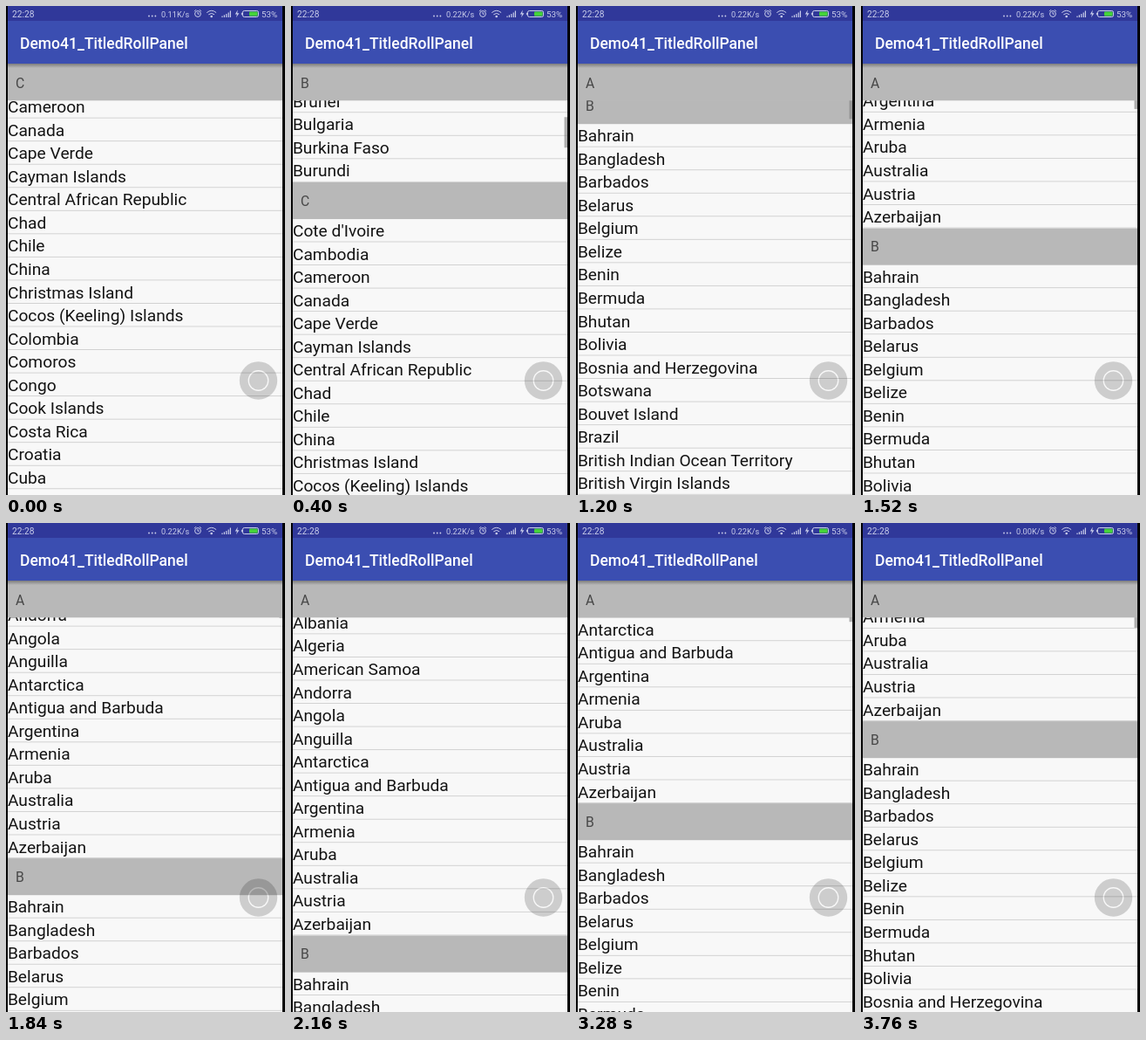
An HTML page for the animation above (3840 ms loop, 320 by 560 pixels).

```html
<!DOCTYPE html>
<html lang="en">
<head>
<meta charset="utf-8">
<title>Section list</title>
<style>
html, body { margin: 0; width: 100%; height: 100%; overflow: hidden; background: #000; }
svg { display: block; width: 320px; height: 560px; font-family: Roboto, sans-serif; }
.row { font-size: 19.22px; fill: #141414; }
.head { font-size: 15.8px; fill: #484848; }
.status { font-size: 10.2px; fill: #c9cdea; }
</style>
</head>
<body>
<svg viewBox="0 0 320 560" xmlns="http://www.w3.org/2000/svg">
  <defs>
    <clipPath id="pane"><rect x="2" y="66" width="315" height="494"/></clipPath>
    <linearGradient id="shade" x1="0" y1="0" x2="0" y2="1">
      <stop offset="0" stop-color="#000" stop-opacity=".32"/>
      <stop offset="1" stop-color="#000" stop-opacity="0"/>
    </linearGradient>
  </defs>
  <rect width="320" height="560" fill="#000"/>
  <g clip-path="url(#pane)">
    <rect x="2" y="66" width="315" height="494" fill="#f8f8f8"/>
    <g id="list"></g>
    <rect id="bar" x="313.5" width="4" height="35" fill="#7d7d7d" fill-opacity=".6"/>
    <rect x="2" y="66" width="315" height="42.3" fill="#b8b8b8"/>
    <text id="sticky" class="head" x="11" y="93.6"></text>
    <rect x="2" y="66" width="315" height="5" fill="url(#shade)"/>
  </g>
  <rect x="2" width="315" height="17" fill="#30389a"/>
  <rect x="2" y="17" width="315" height="49" fill="#3b4eb1"/>
  <text x="16" y="49" font-size="17.53" font-weight="500" fill="#fff">Demo41_TitledRollPanel</text>

  <g class="status">
    <text x="7" y="12.7">22:28</text>
    <circle cx="164" cy="11.5" r=".9"/><circle cx="167.7" cy="11.5" r=".9"/><circle cx="171.4" cy="11.5" r=".9"/>
    <text id="speed" x="178" y="12.7" font-size="9.2"></text>
    <text x="293" y="12.7" font-size="9.9">53%</text>
  </g>
  <g fill="none" stroke="#c9cdea" stroke-width="1">
    <circle cx="220" cy="9" r="3.4"/>
    <path d="M220 7v2.2h1.6M216 6.2l2-2M224 6.2l-2-2"/>
    <path d="M230.3 7.6q5.4-4.6 10.8 0M232.3 9.8q3.4-2.8 6.8 0"/>
    <path d="M248 13v-1.5M250.4 13v-2.7M252.8 13v-4M255.2 13v-5.6M257.4 13v-7.4" stroke-width="1.2"/>
    <rect x="271.5" y="5.5" width="18" height="7" rx="1.8"/>
    <path d="M270.4 7.7v2.6"/>
  </g>
  <circle cx="235.7" cy="12" r="1.3" fill="#c9cdea"/>
  <path d="M265.8 4.6l-3 4.8h2.2l-1 3.8 3.4-5h-2.2z" fill="#c9cdea"/>
  <rect x="279" y="6.5" width="9.6" height="5" rx=".8" fill="#45d33a"/>

  <!-- Dark disc with a clear ring that lets the list show through -->
  <g opacity=".17">
    <circle cx="289.5" cy="429" r="10.6"/>
    <circle cx="289.5" cy="429" r="16.8" fill="none" stroke="#000" stroke-width="9.8"/>
  </g>
</svg>
<script>
const LOOP = 3840, STEP = 80;
const ROW = 26.54, HEAD = 42.1, TOP = 110, PANE = 66;

const sections = {
  A: "Afghanistan,Albania,Algeria,American Samoa,Andorra,Angola,Anguilla,Antarctica,Antigua and Barbuda,Argentina,Armenia,Aruba,Australia,Austria,Azerbaijan",
  B: "Bahrain,Bangladesh,Barbados,Belarus,Belgium,Belize,Benin,Bermuda,Bhutan,Bolivia,Bosnia and Herzegovina,Botswana,Bouvet Island,Brazil,British Indian Ocean Territory,British Virgin Islands,Brunei,Bulgaria,Burkina Faso,Burundi",
  C: "Cote d'Ivoire,Cambodia,Cameroon,Canada,Cape Verde,Cayman Islands,Central African Republic,Chad,Chile,China,Christmas Island,Cocos (Keeling) Islands,Colombia,Comoros,Congo,Cook Islands,Costa Rica,Croatia,Cuba,Cyprus,Czech Republic"
};

// Scroll knots: time, offset, velocity (px per ms)
const knots = [
  [0, 1074, -0.35], [720, 690.5, -0.57], [1200, 415, -0.53], [1840, 124, -0.33],
  [2480, 0, 0], [3040, 0, 0.5], [3280, 187, 0.45], [3760, 281, 0.05], [3840, 283, 0]
];

const $ = id => document.getElementById(id);
const list = $("list"), bar = $("bar"), sticky = $("sticky"), speed = $("speed");

function add(tag, attrs, text) {
  const el = document.createElementNS("http://www.w3.org/2000/svg", tag);
  for (const key in attrs) el.setAttribute(key, attrs[key]);
  if (text) el.textContent = text;
  list.appendChild(el);
}

const heads = [];
let y = TOP - HEAD;
for (const letter in sections) {
  heads.push({ letter, y });
  add("rect", { x: 2, y, width: 315, height: HEAD, fill: "#b8b8b8" });
  add("text", { class: "head", x: 11, y: y + 26.8 }, letter);
  y += HEAD;
  for (const name of sections[letter].split(",")) {
    add("text", { class: "row", x: 1.9, y: y + 20 }, name);
    add("rect", { x: 2, y: y + 25.5, width: 315, height: 0.9, fill: "#cfcfcf" });
    y += ROW;
  }
}

function scrollAt(t) {
  let i = 0;
  while (i < knots.length - 2 && t >= knots[i + 1][0]) i++;
  const [t0, p0, v0] = knots[i], [t1, p1, v1] = knots[i + 1];
  if (p0 === p1) return p0;
  const d = t1 - t0, u = (t - t0) / d, w = 1 - u;
  return w * w * ((1 + 2 * u) * p0 + u * d * v0) + u * u * ((3 - 2 * u) * p1 - w * d * v1);
}

function draw(now) {
  const t = Math.floor((now % LOOP) / STEP) * STEP;
  const s = scrollAt(t);
  list.setAttribute("transform", `translate(0 ${-s.toFixed(2)})`);
  bar.setAttribute("y", (65 + 0.0708 * s).toFixed(2));
  bar.setAttribute("visibility", t > 0 ? "visible" : "hidden");
  const current = heads.filter(h => h.y - s <= PANE).pop() || heads[0];
  sticky.textContent = current.letter;
  speed.textContent = (t < 400 ? "0.11" : t < 3520 ? "0.22" : "0.00") + "K/s";
}

const start = performance.now();
function tick() {
  draw(performance.now() - start);
  requestAnimationFrame(tick);
}
tick();
</script>
</body>
</html>
```
